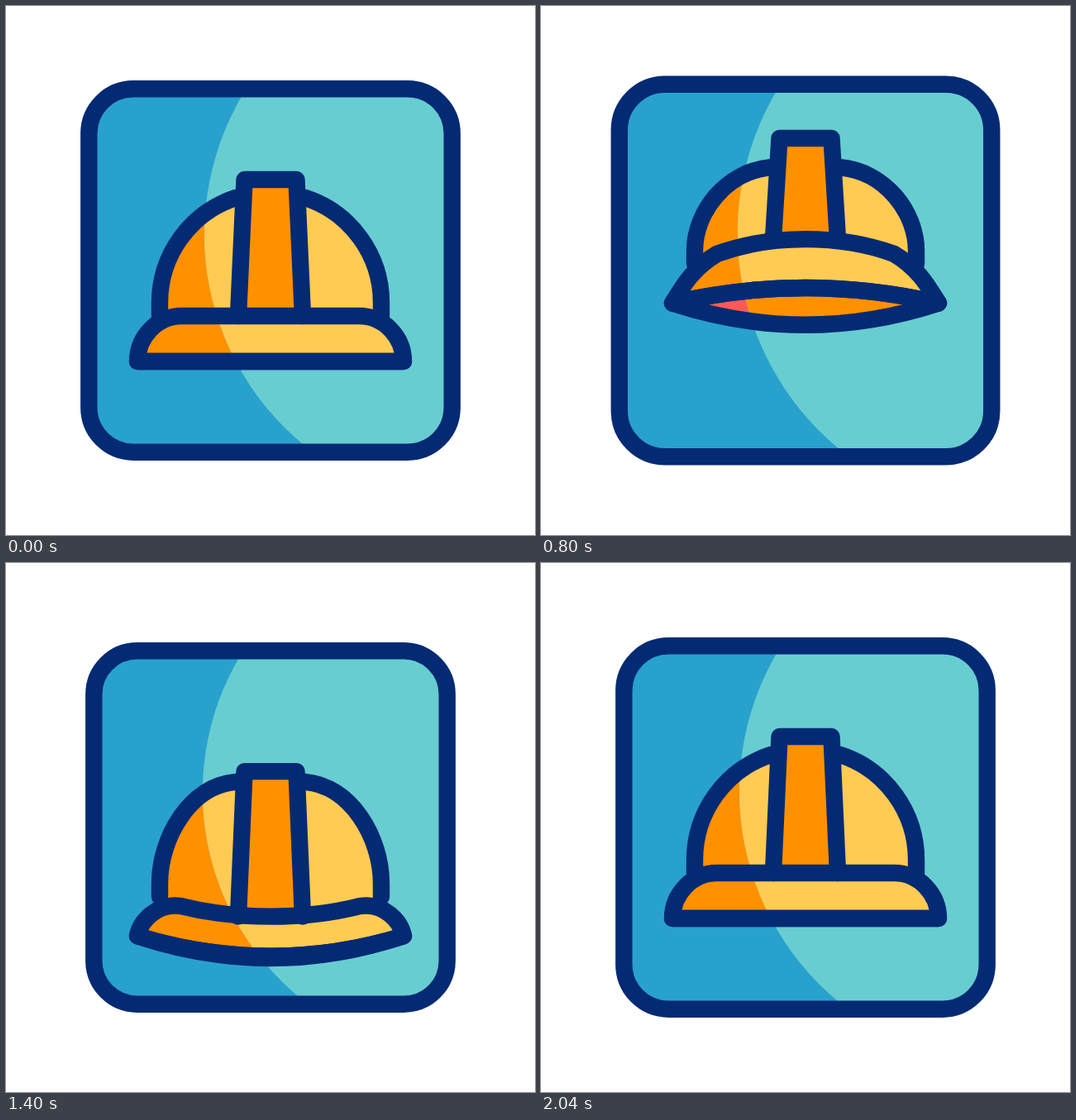
Recreate the animation shown at these times as an HTML page. Size 640 px wide and 640 px high, loop 3000 ms.

```html
<!DOCTYPE html>
<html lang="en">
<head>
<meta charset="utf-8">
<title>Hard hat</title>
<style>
html, body { margin: 0; width: 100%; height: 100%; overflow: hidden; background: #fff; }
svg { display: block; width: 100vw; height: 100vh; }
.dark { --back: #28a1cd; --hat: #ff9100; --under: #ff5a55; }
.light { --back: #67cdd1; --hat: #ffcb52; --under: #ff9100; }
.tile { fill: var(--back); }
.shell, .brim { fill: var(--hat); }
.lens { fill: var(--under); }
.ridge { fill: #ff9100; }
.dome { fill: none; }
.outline { stroke: #042a74; stroke-width: 20.4; stroke-linecap: round; stroke-linejoin: round; }
.outline * { fill: none; }
.outline .shell { stroke: none; }
</style>
</head>
<body>
<svg viewBox="0 0 640 640">
  <clipPath id="lit"><circle id="glow"/></clipPath>
  <g class="dark"></g>
  <g class="light" clip-path="url(#lit)"></g>
  <g class="outline"></g>
</svg>
<script>
const LOOP = 3000, STEP = 40;
const NS = 'http://www.w3.org/2000/svg';
const groups = [...document.querySelectorAll('g')];
const glow = document.getElementById('glow');
const shapes = {};

for (const name of ['tile', 'lens', 'shell', 'dome', 'ridge', 'brim']) {
  shapes[name] = groups.map(group => {
    const el = document.createElementNS(NS, name === 'tile' ? 'rect' : 'path');
    el.setAttribute('class', name);
    return group.appendChild(el);
  });
}

function setAttrs(el, attrs) {
  for (const key in attrs) el.setAttribute(key, attrs[key]);
}
const draw = (name, attrs) => shapes[name].forEach(el => setAttrs(el, attrs));

// Adds an eased change of `amount` for each [start, end, amount] move.
function ease(time, moves) {
  return moves.reduce((sum, [start, end, amount]) => {
    const u = Math.min(1, Math.max(0, (time - start) / (end - start)));
    return sum + amount * u * u * (3 - 2 * u);
  }, 0);
}

function drawTile(time, tilt) {
  const half = 219.7 + ease(time,
    [[200, 520, -10.5], [520, 1040, 28.8], [1040, 1520, -28.8], [1520, 2040, 10.5]]);
  const scale = half / 219.7, radius = 331 * scale;
  draw('tile', {
    x: 320 - half, y: 320 - half, width: 2 * half, height: 2 * half, rx: half * 0.2455
  });
  setAttrs(glow, { cx: 240 - 0.08 * tilt + radius, cy: 320 - 44 * scale, r: radius });
}

// lift: vertical travel, nod: curve of the near rim, tilt: depth of the far rim
function drawHat(lift, nod, tilt) {
  const arch = 0.7 * nod + 0.18 * tilt;
  const top = 232 + lift + 0.75 * arch;
  const base = 375 + lift - 0.5 * tilt, side = base - 16;
  const brimTop = 375 + lift - 1.25 * nod - 0.75 * tilt;
  const corner = 430 + lift - 0.78 * tilt;

  const shoulder = top + 18 - 0.5 * tilt, bulge = side - 0.454 * (side - top);
  const left = `M186 ${base}V${side}C186 ${bulge} 223 ${shoulder} 278 ${top}`;
  const right = `362 ${top}C417 ${shoulder} 454 ${bulge} 454 ${side}V${base}`;
  draw('dome', { d: `${left}M${right}` });
  draw('shell', { d: `${left}L${right}Q320 ${2 * brimTop - base} 186 ${base}Z` });

  const ridgeTop = 210 + lift;
  draw('ridge', { d: `M281 ${brimTop}L288.5 ${ridgeTop}H351.5L359 ${brimTop}` });

  const pinch = 0.3 * tilt + 0.2 * nod;
  const edge = brimTop + arch, crest = brimTop - arch / 3;
  const lead = edge + 0.6 * arch + 0.6 * pinch;
  const flare = corner - (0.545 - 0.02 * pinch) * (corner - edge);
  const near = `Q320 ${corner - 2 * nod} 159 ${corner}Z`;
  draw('brim', { d: `M159 ${corner}
    C${159 + pinch} ${flare} 183 ${lead} 213 ${edge}
    C278 ${crest} 362 ${crest} 427 ${edge}
    C457 ${lead} ${481 - pinch} ${flare} 481 ${corner}${near}` });
  draw('lens', { d: `M159 ${corner}Q320 ${corner + 2 * tilt} 481 ${corner}${near}` });
}

function render(time) {
  const lift = ease(time, [[200, 740, -52.5], [740, 1360, 95], [1360, 2040, -42.5]]);
  const nod = ease(time, [[280, 800, 18.5], [800, 1440, -43.5], [1440, 2040, 25]]);
  const tilt = ease(time, [[240, 860, 27], [1360, 2040, -27]]);
  drawTile(time, tilt);
  drawHat(lift, nod, tilt);
}

function tick() {
  const time = performance.now() % LOOP;
  render(Math.floor(time / STEP) * STEP);
  requestAnimationFrame(tick);
}
tick();
</script>
</body>
</html>
```
